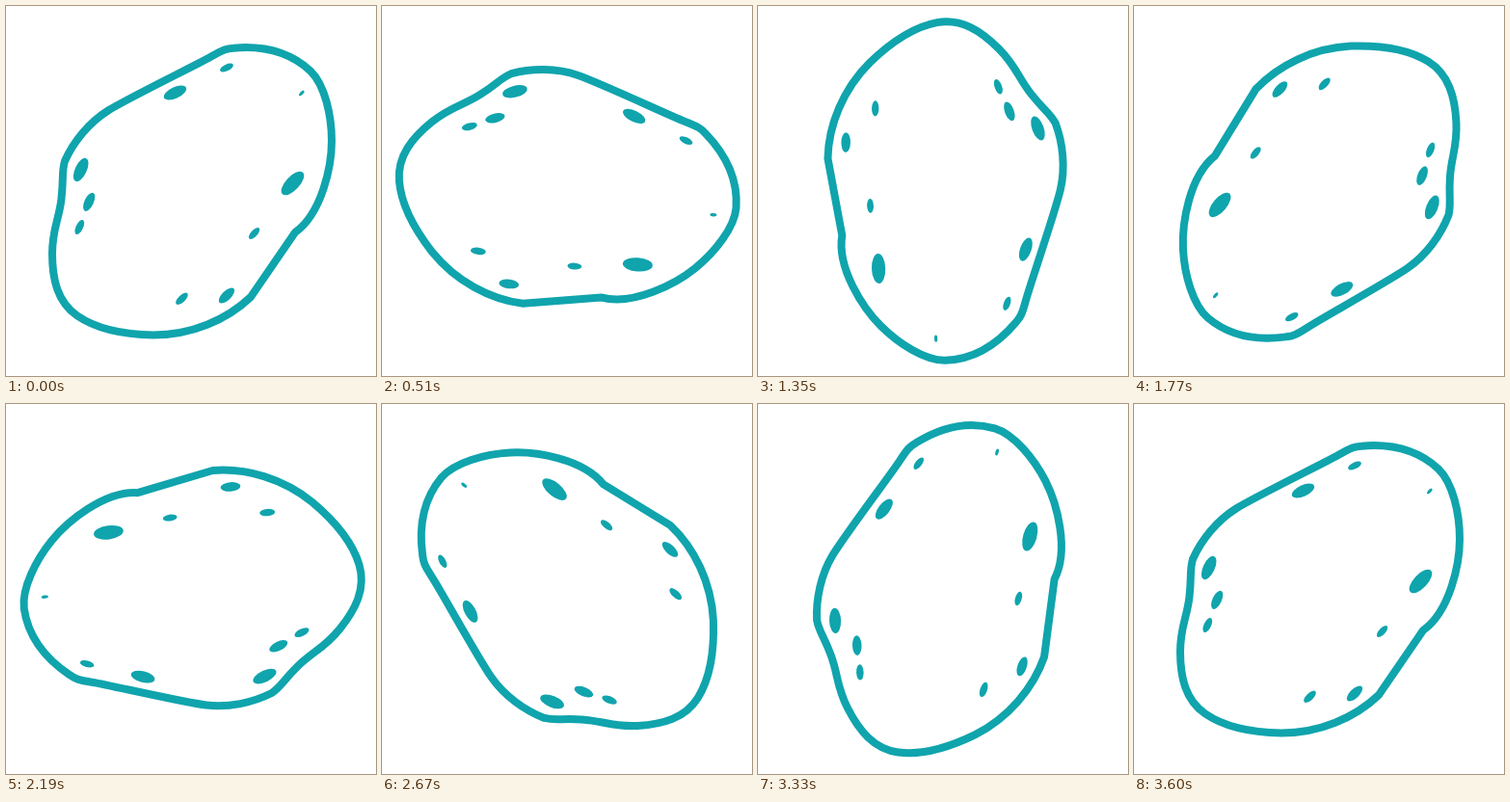
An HTML page with a canvas that plays this animation: 384 px wide and 384 px high, repeating every 3.63 s.

```html
<!DOCTYPE html>
<html lang="en">
<head>
<meta charset="utf-8">
<title>Spinning potato</title>
<style>
  html, body { margin: 0; width: 100%; height: 100%; overflow: hidden; background: #fff; }
  canvas { display: block; width: 384px; height: 384px; }
</style>
</head>
<body>
<canvas id="stage" width="384" height="384"></canvas>
<script>
const SIZE = 384;
const PIVOT = { x: 193, y: 192.5 };
const LOOP = 3630, STEP = 30, DEGREES_PER_STEP = 3;
const TEAL = '#10a4ad';
const ROUNDNESS = 0.46;
const ctx = document.getElementById('stage').getContext('2d');

const outline = new Path2D(`
  M236 43.7
  C267 41 295 48 316 67.5
  C331 82 338 114 338 140
  S328 215 300 235
  L254 302
  C229 326 192 341.5 153 341.5
  C125 341 95 336 74 321.5
  S48 283 48 257
  S55 222 57.5 200
  S57.5 173 61 161
  C70 141 86 121 106 108.5
  S198 61 212 53
  S229 44 236 43.7 Z`);

const radians = degrees => degrees * Math.PI / 180;

// Spots of one cluster share a tilt and shrink steadily from the first.
function drawCluster(tilt, size, shrink, ...centers) {
  centers.forEach(([x, y], i) => {
    const radius = size * shrink ** i;
    ctx.beginPath();
    ctx.ellipse(x, y, radius, radius * ROUNDNESS, radians(tilt), 0, 2 * Math.PI);
    ctx.fill();
  });
}

function drawPotato() {
  ctx.strokeStyle = ctx.fillStyle = TEAL;
  ctx.lineWidth = 8;
  ctx.lineJoin = 'round';
  ctx.stroke(outline);
  drawCluster(-25, 12.6, 0.59, [175.5, 90], [229, 64]);
  drawCluster(-47, 15.5, 0.48, [297.5, 184], [257.6, 236], [306.8, 90.5]);
  drawCluster(-44, 10.4, 0.77, [229, 300.5], [182.5, 303.8]);
  drawCluster(-65, 13.1, 0.79, [77.7, 170], [86.2, 203.3], [76.3, 229.5]);
}

function draw(time) {
  const step = Math.floor(time % LOOP / STEP);
  ctx.fillStyle = '#fff';
  ctx.fillRect(0, 0, SIZE, SIZE);
  ctx.save();
  ctx.translate(PIVOT.x, PIVOT.y);
  ctx.rotate(radians(step * DEGREES_PER_STEP));
  ctx.translate(-PIVOT.x, -PIVOT.y);
  drawPotato();
  ctx.restore();
}

let start;
function tick(now) {
  start ??= now;
  draw(now - start);
  requestAnimationFrame(tick);
}

draw(0);
requestAnimationFrame(tick);
</script>
</body>
</html>
```
